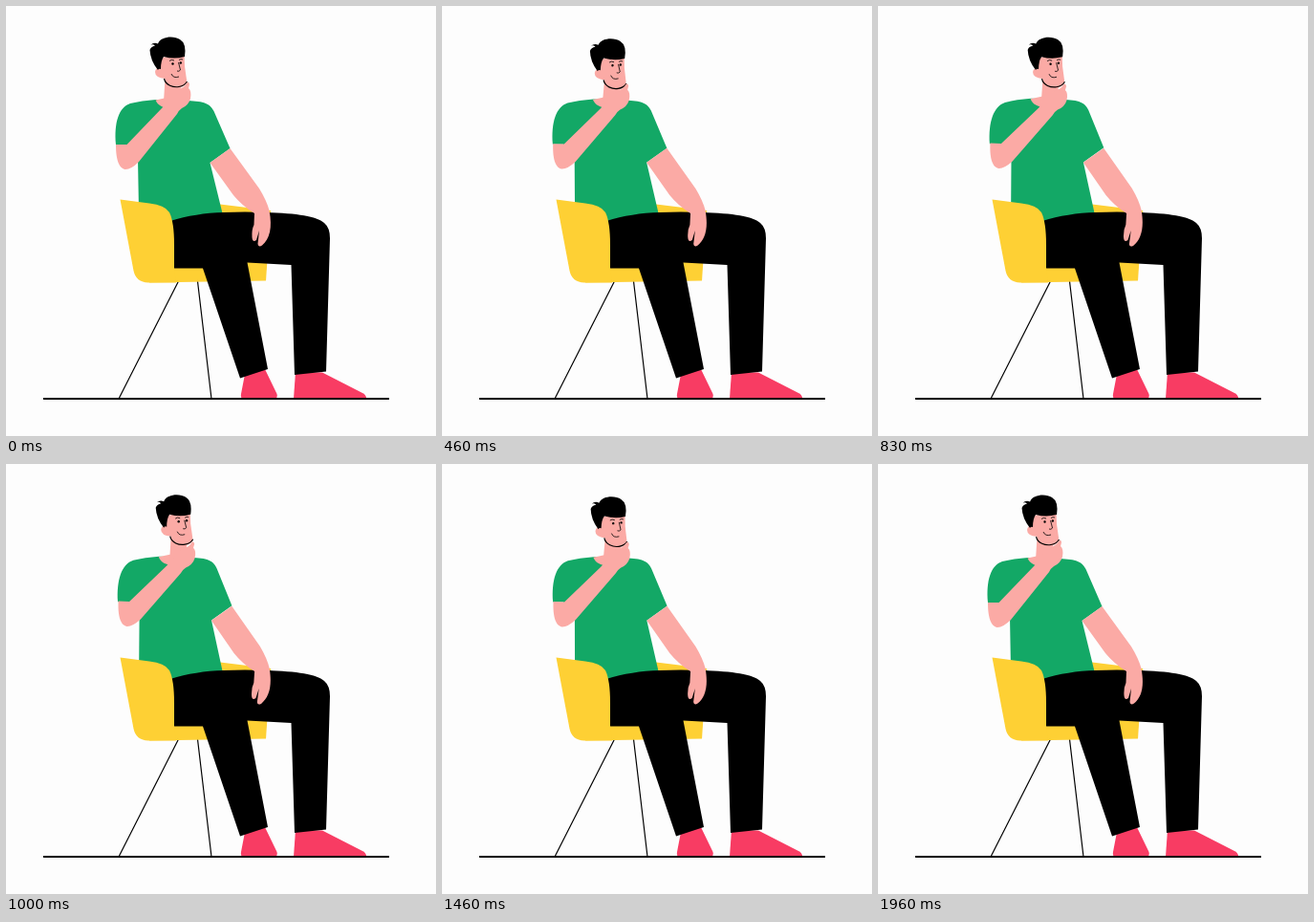
Write an HTML page that moves like this. It is 450 px wide and 450 px high and loops after 2000 ms.

```html
<!DOCTYPE html>
<html lang="en">
<head>
<meta charset="utf-8">
<title>Thinking man on a chair</title>
<style>
html, body { margin: 0; width: 100%; height: 100%; overflow: hidden; background: #fdfdfd; }
svg { display: block; width: 100vw; height: 100vh; }
.skin { fill: #fbaaa5; }
.shirt { fill: #13a866; }
.chair { fill: #fed034; }
.shoe { fill: #f83c63; }
.line { fill: none; stroke: #000; stroke-width: 1.2; stroke-linejoin: round; }
.thin { stroke-width: .8; }
.floor { stroke-width: 2; }
</style>
</head>
<body>
<svg viewBox="0 0 450 450">
  <path class="line" d="M180.500 288 118 411M200.500 288 215 411"/>
  <path class="chair" d="M224 207.500 L277 214 L272 287.500 L150 289.500 L160 230 Z"/>

  <g id="torso">
    <path class="shirt" d="M115 145 C113 122 118 106 130 102 Q142 99 157 98 L187 99 C205 99.500 213 101 217.500 110 L234.500 149 L213.500 164 L227.500 221 L175 229 L139 215 L138 160 L126 145 Z"/>
    <path class="skin" d="M156.500 98.500 C159 104 164 107 172 107 L186 99 L168 96 Z"/>
  </g>

  <path class="shoe" d="M251 380 L270 378 L283.500 406 Q285 411 280 411 L249 411 Q245 411 246 406 Z"/>
  <path class="shoe" d="M303 383 L331 383.500 L374 405.500 Q377.500 408 377 411 L301 411 Z"/>
  <path d="M172 225 C190 219.500 208 216.500 228 216 Q250 215 272 216 C305 217 325 220 333 227 Q339 232 339 243 L335 382.500 L302 386 L298.500 271 L252.500 268.500 L274 380 L245 389.500 L206 274.500 L172 274.500 Z"/>
  <path class="chair" d="M119.500 202.500 L150 206.500 Q166 208 171 216 Q176 226 176 250 L176 274 L178 289.500 L149 289.500 Q136 289 133.500 277 Z"/>

  <path id="rest" class="skin" d="M213.500 164 L234.500 149 L265 191 Q273 204 275.500 214 C279 232 276 244 268 250.500 Q264 253 263.500 249 L265 235 L262 245 Q258 248 257.500 242 Q257 234 259.500 229 L260 217 Q247 209 238 198 Z"/>

  <g id="head">
    <path class="skin" d="M162 54 L186.500 51 L187 63 L189 77 Q190 83 183 85 L181 100 L165 100 L166.500 76 Q156 75 156 69 Q157 64 161 65 Z"/>
    <path d="M159 67 Q151 57 150.500 46 Q151.500 42.500 156 41.500 Q154 39.500 151.500 40.500 Q155 37.500 159 39.500 C162 31.500 176 31 182 35 Q189 39 187 53 Q176 56 165 53 Q162 57 162 66 Q160 65 159 67 Z"/>
    <path class="line" d="M165.500 76 C167 83 175 85.500 181 84.500 Q187 83.500 189.500 79"/>
    <path class="line thin" d="M171 57.500 Q173 55.500 176 57M181 56.500 Q183 55 185 56M180.500 59 L182.500 67 Q181 69 179 68M173 71 Q175 76 181 74"/>
    <circle cx="174.500" cy="60.500" r="1.200"/>
    <circle cx="182.800" cy="59.500" r="1.200"/>
  </g>

  <path id="arm" class="skin" d="M115 145 L126.500 145 L164 106 Q167 101 171 97 Q175 90 181 87 Q187 85 189 80.500 Q191 78 192 82 L191 86 Q194.500 89 193 97 Q191 104 184 107 Q181 109 179 113 L139 163 Q131 171 125 171 C117 170 115 157 115 145 Z"/>

  <path class="line floor" d="M39 411 H401"/>
</svg>
<script>
const LOOP = 2000;
const wave = turns => (1 - Math.cos(2 * Math.PI * turns)) / 2;
const move = (id, transform) =>
  document.getElementById(id).setAttribute("transform", transform);

// Lean sideways above a fixed waist height, stretching slightly upwards.
const lean = (sway, rise, y) =>
  `translate(0 ${y}) matrix(1 0 ${-sway} ${1 + rise} 0 0) translate(0 ${-y})`;

function draw(now) {
  const t = now % LOOP / LOOP;
  const sway = wave(t), nod = wave(2 * t);
  move("torso", lean(.027 * sway, .01 * sway, 220));
  move("rest", lean(.025 * sway, .005 * sway, 222));
  move("head", `translate(${6.2 * sway + .5 * nod} ${2 * nod - .3 * sway}) rotate(${1.6 * nod} 180 88)`);
  move("arm", `translate(${2.4 * sway} ${-1.2 * sway}) rotate(${2.4 * sway + .8 * nod} 122 150)`);
  requestAnimationFrame(draw);
}
requestAnimationFrame(draw);
</script>
</body>
</html>
```
